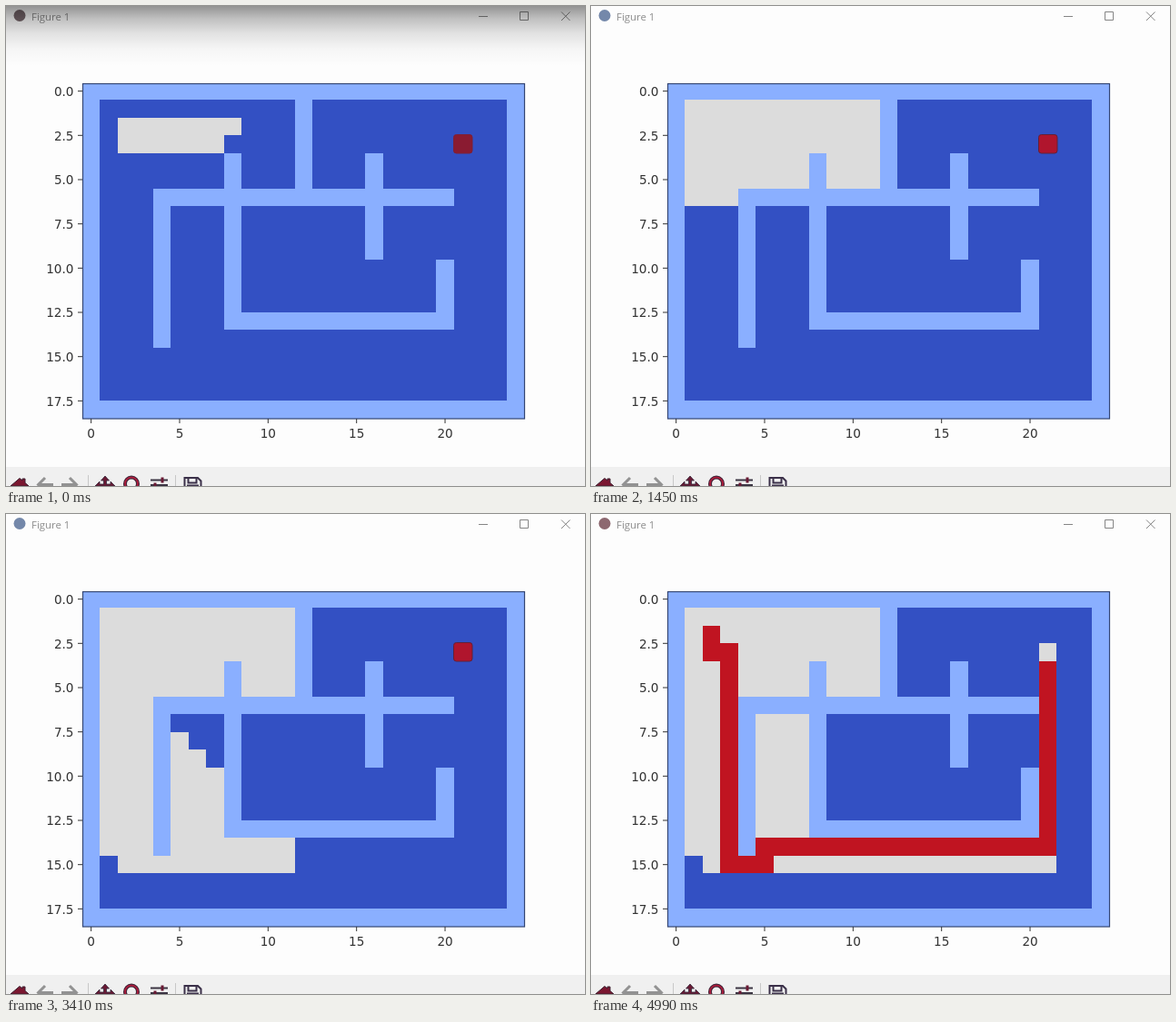
These frames come from a looping animation (637x528 px, 5.59 s). An HTML page:

```html
<!DOCTYPE html>
<html lang="en">
<head>
<meta charset="utf-8">
<title>Figure 1</title>
<style>
  html, body { margin: 0; width: 100%; height: 100%; overflow: hidden; background: #fdfdfd; }
  svg { display: block; }
  .tick { font: 13.6px "DejaVu Sans", sans-serif; fill: #333; }
  .title { font: 11.4px "Open Sans", sans-serif; fill: #8c8c8c; }
</style>
</head>
<body>
<svg width="637" height="528" viewBox="0 0 637 528">
  <defs>
    <linearGradient id="fade" x1="0" y1="0" x2="0" y2="1">
      <stop offset="0" stop-opacity=".42"/>
      <stop offset=".2" stop-opacity=".25"/>
      <stop offset=".45" stop-opacity=".11"/>
      <stop offset=".72" stop-opacity=".03"/>
      <stop offset="1" stop-opacity="0"/>
    </linearGradient>
  </defs>
  <rect width="637" height="528" fill="#fdfdfd"/>

  <!-- toolbar -->
  <rect y="507" width="637" height="21" fill="#f0f0f0"/>
  <path d="M90.5 516v12M186.5 516v12" stroke="#c8c8c8"/>
  <path d="M5 528L15 519.5L18 522V520H21V524.5L25 528Z" fill="#7b1730" stroke="#3c2030"/>
  <g fill="none" stroke="#929292" stroke-width="3">
    <path d="M43 519L35.5 526.5L38 529M36 526.5H52"/>
    <path d="M70 519L77.5 526.5L75 529M77 526.5H61"/>
  </g>
  <path d="M109 517L113.5 522H110.5V526H115V523L120 528H98L103 523V526H107.5V522H104.5Z" fill="#6a1a34" stroke="#33263a" stroke-width=".8"/>
  <circle cx="138" cy="525.5" r="7" fill="none" stroke="#44263a" stroke-width="4"/>
  <circle cx="138" cy="525.5" r="7" fill="none" stroke="#b51c3c" stroke-width="1.6"/>
  <g stroke="#3b3442" stroke-width="2">
    <path d="M159 521.5H178M159 527H178"/>
    <path d="M172 518.5v6M164 524.5v4" stroke="#6a1a34" stroke-width="3"/>
  </g>
  <path d="M196.5 529V519H211L214.5 522.5V529M200.5 519V524.5H209.5V519M200 529V527.5H211V529" fill="none" stroke="#3b3049" stroke-width="2"/>

  <!-- title bar -->
  <circle id="badge" cx="15" cy="10.5" r="6.5"/>
  <text class="title" x="28" y="15.5">Figure 1</text>
  <path d="M520 11.5H530M565.5 6.5H574.5V15.5H565.5ZM611 6.5L620.5 16M620.5 6.5L611 16" fill="none" stroke="#858585"/>

  <!-- plot -->
  <g id="grid" shape-rendering="crispEdges"></g>
  <rect id="goal" x="492.5" y="141.5" width="20.5" height="20.5" rx="3"/>
  <rect x="84.5" y="85.5" width="486" height="368.5" fill="none" stroke="#344674" stroke-width="1.2"/>
  <g id="ticks"></g>
  <rect id="shade" width="637" height="66" fill="url(#fade)"/>
</svg>
<script>
const begin = performance.now();
const LOOP = 5590, PATH_AT = 4990, STEP = 69.4;
const LEAD = 17; // a drawn picture reaches the screen one refresh later
const COLS = 25, ROWS = 19;
const start = [2, 2], goal = [21, 3];
const BLUE = '#3350c3', WALL = '#8aafff', SEEN = '#dcdcdc', RED = '#c01421';
const $ = id => document.getElementById(id);

function add(parent, tag, attrs, text) {
  const el = document.createElementNS('http://www.w3.org/2000/svg', tag);
  for (const k in attrs) el.setAttribute(k, attrs[k]);
  if (text !== undefined) el.textContent = text;
  return parent.appendChild(el);
}

const edge = k => k ? Math.round(83.9 + 19.47 * k) : 84;
const mid = k => 83.9 + 19.47 * (k + .5);

// Block of cells, inclusive on both ends
function block(parent, c0, r0, c1, r1, fill) {
  const x = edge(c0), y = r0 ? edge(r0) : 85;
  return add(parent, 'rect', {
    x, y, width: edge(c1 + 1) - x, height: edge(r1 + 1) - y, fill
  });
}

const walls = [
  [0, 0, 24, 0], [0, 18, 24, 18], [0, 0, 0, 18], [24, 0, 24, 18],
  [12, 1, 12, 5], [4, 6, 20, 6], [4, 6, 4, 14], [8, 4, 8, 13],
  [8, 13, 20, 13], [16, 4, 16, 9], [20, 10, 20, 13]
];
const route = [[2, 2, 2, 3], [3, 3, 3, 15], [3, 15, 5, 15], [5, 14, 21, 14], [21, 4, 21, 14]];
const isWall = (c, r) => walls.some(([a, b, d, e]) => c >= a && c <= d && r >= b && r <= e);

// A* visiting order: step distance from a flood fill, sorted by f, g, column
function visitOrder() {
  const key = (c, r) => r * COLS + c;
  const found = new Set([key(...start)]);
  const cells = [{ c: start[0], r: start[1], g: 0 }];
  for (const { c, r, g } of cells) {
    for (const [dc, dr] of [[0, -1], [1, 0], [0, 1], [-1, 0]]) {
      const x = c + dc, y = r + dr;
      if (isWall(x, y) || found.has(key(x, y))) continue;
      found.add(key(x, y));
      cells.push({ c: x, r: y, g: g + 1 });
    }
  }
  for (const p of cells) p.f = p.g + Math.abs(p.c - goal[0]) + Math.abs(p.r - goal[1]);
  cells.sort((a, b) => a.f - b.f || a.g - b.g || a.c - b.c);
  return cells.slice(0, cells.findIndex(p => p.c === goal[0] && p.r === goal[1]) + 1);
}

const grid = $('grid');
block(grid, 0, 0, COLS - 1, ROWS - 1, BLUE);
const visited = visitOrder().map(p => block(grid, p.c, p.r, p.c, p.r, SEEN));
walls.forEach(w => block(grid, ...w, WALL));
const trail = add(grid, 'g', {});
route.forEach(s => block(trail, ...s, RED));

const ticks = $('ticks');
for (let v = 0; v <= 20; v += 5) {
  add(ticks, 'path', { d: `M${mid(v)} 454v5`, stroke: '#333' });
  add(ticks, 'text', { class: 'tick', x: mid(v), y: 475, 'text-anchor': 'middle' }, v);
}
for (let v = 0; v <= 17.5; v += 2.5) {
  add(ticks, 'path', { d: `M84 ${mid(v)}h-5`, stroke: '#333' });
  add(ticks, 'text', { class: 'tick', x: 74.5, y: mid(v) + 5.3, 'text-anchor': 'end' }, v.toFixed(1));
}

const show = (el, on) => el.setAttribute('visibility', on ? 'visible' : 'hidden');
const clamp = v => Math.min(1, Math.max(0, v));

function draw(t) {
  const first = t < 70;
  const count = first ? 13 : 14 + 2 * Math.floor((t + 10) / STEP);
  visited.forEach((el, i) => show(el, i < count));
  show(trail, t >= PATH_AT);
  const mark = $('goal');
  show(mark, count < visited.length);
  mark.setAttribute('fill', first ? '#8a1b31' : '#b0152d');
  mark.setAttribute('stroke', first ? '#7c2038' : '#622038');
  $('badge').setAttribute('fill', t < 1320 ? '#76666b' : t < PATH_AT ? '#7488aa' : '#8d6870');
  $('shade').setAttribute('opacity', clamp((1450 - t) / 130));
}

function tick() {
  draw((performance.now() - begin + LEAD) % LOOP);
  requestAnimationFrame(tick);
}
tick();
</script>
</body>
</html>
```
